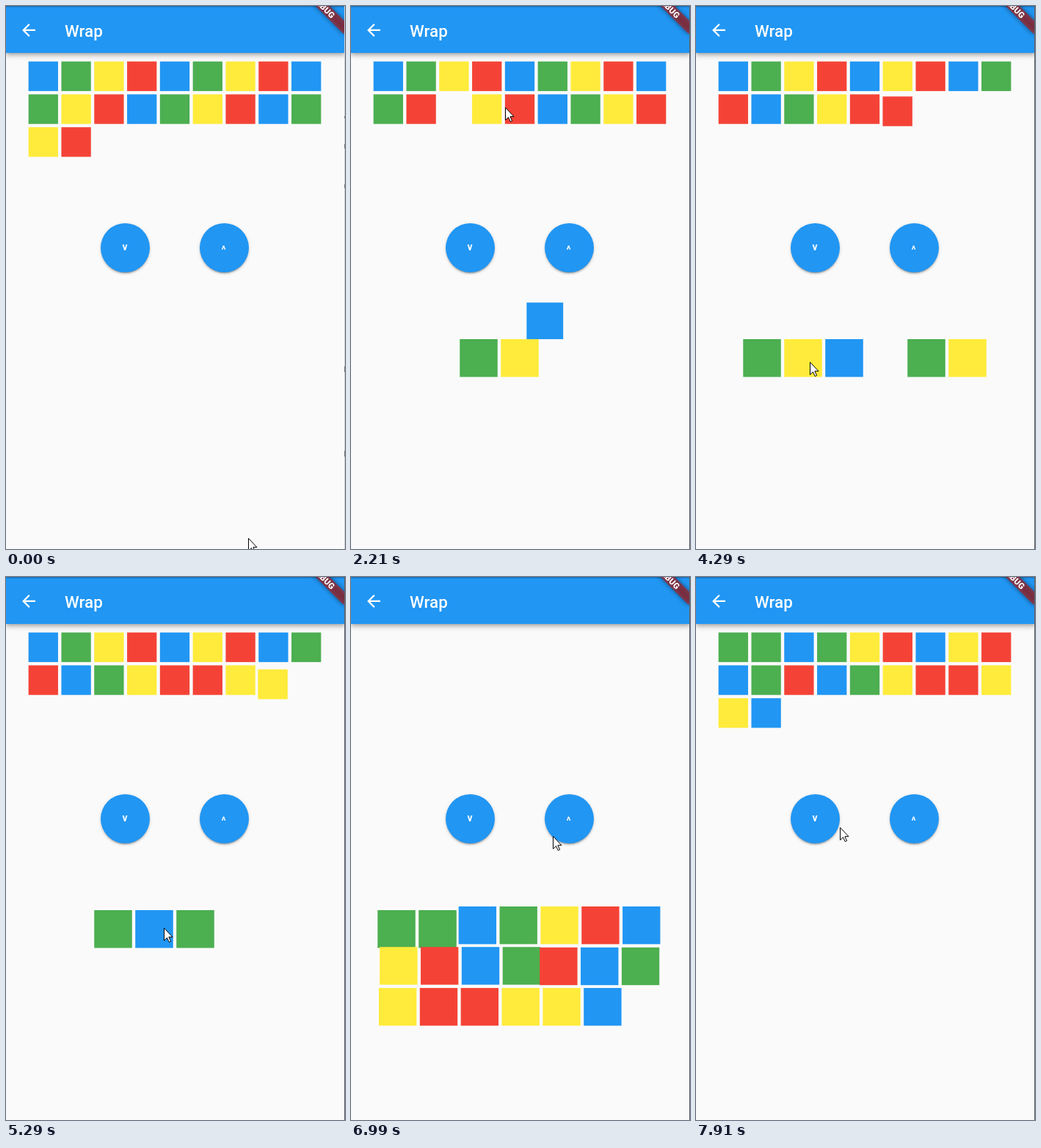
Write an HTML page with a canvas that moves like this. It is 462 px wide and 740 px high and loops after 7.99 s.

```html
<!DOCTYPE html>
<html lang="en">
<head>
<meta charset="utf-8">
<title>Wrap</title>
<style>
  html, body { margin: 0; width: 100%; height: 100%; overflow: hidden; background: #fafafa; }
  body { position: relative; font-family: Roboto, sans-serif; }
  .bar {
    position: absolute; left: 0; top: 0; width: 462px; height: 64.3px; background: #2196f3;
    box-shadow: 0 2.2px 4.5px -1px rgba(0,0,0,.2), 0 4.5px 5.6px rgba(0,0,0,.14), 0 1px 11px rgba(0,0,0,.12);
  }
  .btn {
    position: absolute; top: 295.9px; width: 67.2px; height: 67.2px; border-radius: 50%; background: #2196f3;
    box-shadow: 0 3.4px 1.1px -2.2px rgba(0,0,0,.2), 0 2.2px 2.2px rgba(0,0,0,.14), 0 1.1px 5.6px rgba(0,0,0,.12);
  }
  svg, canvas { position: absolute; left: 0; top: 0; width: 462px; height: 740px; }
  text { fill: #fff; font-weight: 500; }
  .sign { font-size: 14px; font-weight: 700; text-anchor: middle; }
  .edge { animation: edge 7990ms step-end infinite; }
  .specks { animation: specks 7990ms step-end infinite; }
  @keyframes edge { 0% { fill: #cfd2d4; } 3.75%, 100% { fill: #5c6065; } }
  @keyframes specks { 0% { opacity: 1; } 3.75%, 100% { opacity: 0; } }
</style>
</head>
<body>
<div class="bar"></div>
<div class="btn" style="left:129.2px"></div>
<div class="btn" style="left:263.6px"></div>
<svg viewBox="0 0 462 740">
  <rect width="462" height="1.5" fill="#000" opacity=".25"/>
  <path transform="translate(17.6 19.5) scale(1.12)" fill="#fff"
    d="M20 11H7.83l5.59-5.59L12 4l-8 8 8 8 1.41-1.41L7.83 13H20z"/>
  <text x="80" y="41.5" font-size="22.4">Wrap</text>
  <g transform="translate(460 -25.3) rotate(45) scale(1.12)">
    <rect x="-40" y="28" width="80" height="12" fill="#000" opacity=".5" style="filter:blur(3px)"/>
    <rect x="-40" y="28" width="80" height="12" fill="#b71c1c" opacity=".627"/>
    <text y="37.6" font-size="10.2" text-anchor="middle" style="font-weight:900">DEBUG</text>
  </g>
  <text class="sign" x="162" y="333">v</text>
  <text class="sign" x="296.6" y="337">^</text>
  <rect class="edge" x="461" width="1" height="740"/>
  <path class="specks" stroke="#777" d="M461.5 150v3M461.5 188v6M461.5 243v5M461.5 491v8M461.5 606v8"/>
</svg>
<canvas id="stage" width="462" height="740"></canvas>
<script>
const LOOP = 7990, FLIGHT = 300, EVERY = -1;
const COLORS = ['#2196f3', '#4caf50', '#ffeb3b', '#f44336'];
const ctx = document.getElementById('stage').getContext('2d');

// the two wraps: slots per row, slot pitch, square size, top edge
const WRAPS = [
  { cols: 9, pitch: 44.8, size: 40.32, top: 75.6 },
  { cols: 7, pitch: 56, size: 51.52, top: 454 }
];

// clicks: time and square, which flies to the other wrap
const CLICKS = [
  [735, 13], [1605, 10], [2040, 12], [2285, 15], [2723, 5], [3342, 14],
  [4028, 15], [4490, 10], [5041, 14], [5490, 12], [6736, EVERY], [7585, EVERY]
];

// pointer hops: departure time and goal; a hop's length sets its duration
const HOPS = [
  [70, 238, 139], [1210, 105, 140], [1640, 143, 140], [2060, 222, 138], [2300, 275, 113],
  [2723, 100, 152], [3345, 250, 480], [4035, 155, 485], [4480, 300, 486], [5047, 215, 478],
  [5490, 290, 323], [5920, 271, 323], [6300, 190, 341], [6745, 275, 353], [7585, 196, 341]
];

const ARROW = new Path2D('M.5 .5V17.5L4.5 13.7L7.2 19.6L9.6 18.5L6.9 12.7H12z');
const mix = (a, b, k) => a + (b - a) * k;
const clamp = (v, lo, hi) => Math.min(hi, Math.max(lo, v));
const smooth = s => s * s * (3 - 2 * s);

// cubic-bezier(.4, 0, .2, 1)
function ease(x) {
  let lo = 0, hi = 1;
  for (let i = 0; i < 24; i++) {
    const s = (lo + hi) / 2, r = 1 - s;
    if (1.2 * s * r * r + 0.6 * s * s * r + s * s * s < x) lo = s; else hi = s;
  }
  return smooth(lo);
}

function slot(list, id, wrap) {
  const { cols, pitch, size, top } = WRAPS[wrap];
  const i = list.indexOf(id);
  const left = 230 - Math.min(list.length, cols) * pitch / 2 + (pitch - size) / 2;
  return [left + i % cols * pitch, top + Math.floor(i / cols) * pitch, size];
}

function square(id, [x, y, size]) {
  ctx.fillStyle = COLORS[id % 4];
  ctx.fillRect(x, y, size, size);
}

// a flying square keeps its old slot until it lands
function drawSquares(t) {
  const lists = [[...Array(20).keys()], []];
  const flying = new Map();
  for (const [start, id] of CLICKS) {
    if (t < start) break;
    const inTop = id === EVERY ? lists[0].length > lists[1].length : lists[0].includes(id);
    const from = inTop ? 0 : 1;
    const ids = id === EVERY ? [...lists[from]] : [id];
    lists[1 - from].push(...ids);
    if (t >= start + FLIGHT) lists[from] = lists[from].filter(i => !ids.includes(i));
    else ids.forEach(i => flying.set(i, [from, ease((t - start) / FLIGHT)]));
  }
  lists.forEach((list, wrap) => {
    for (const id of list) if (!flying.has(id)) square(id, slot(list, id, wrap));
  });
  for (const [id, [from, k]] of flying) {
    const a = slot(lists[from], id, from);
    const b = slot(lists[1 - from], id, 1 - from);
    square(id, a.map((v, i) => mix(v, b[i], k)));
  }
}

function drawPointer(t) {
  let x = 330, y = 725;
  for (const [start, gx, gy] of HOPS) {
    if (t < start) break;
    const time = clamp(2.5 * Math.hypot(gx - x, gy - y), 200, 500);
    const k = smooth(clamp((t - start) / time, 0, 1));
    x = mix(x, gx, k);
    y = mix(y, gy, k);
  }
  ctx.save();
  ctx.translate(Math.round(x), Math.round(y));
  ctx.fillStyle = '#fff';
  ctx.strokeStyle = '#000';
  ctx.fill(ARROW);
  ctx.stroke(ARROW);
  ctx.restore();
}

function frame(now) {
  const t = now % LOOP;
  ctx.clearRect(0, 0, 462, 740);
  drawSquares(t);
  drawPointer(t);
  requestAnimationFrame(frame);
}
frame(0);
</script>
</body>
</html>
```
